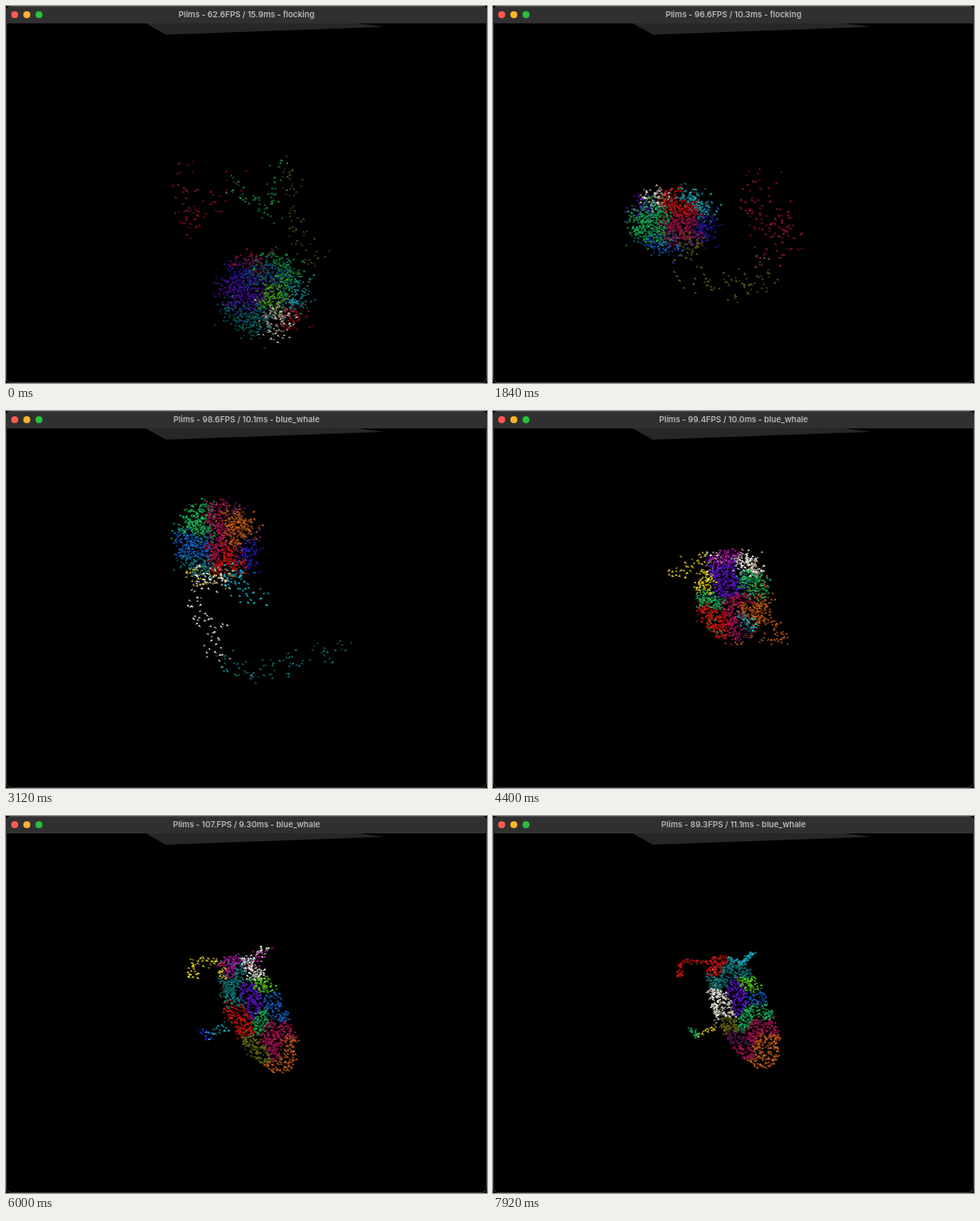
An HTML page with a canvas that plays this animation: 554x434 px, repeating every 8000 ms.

```html
<!DOCTYPE html>
<html lang="en">
<head>
<meta charset="utf-8">
<title>Flocking</title>
<style>
  html, body { margin: 0; width: 100%; height: 100%; overflow: hidden; background: #000; }
  #win { position: relative; width: 554px; height: 434px; overflow: hidden; background: #000; }
  canvas { position: absolute; left: 0; top: 0; }
  #bar { position: absolute; left: 0; top: 0; width: 554px; height: 20px; box-sizing: border-box;
    background: #303030; border-top: 1px solid #4a4a4a; border-radius: 6px 6px 0 0; }
  #bar i { position: absolute; top: 5px; width: 8px; height: 8px; border-radius: 50%; }
  #title { position: absolute; left: 0; top: 0; width: 554px; text-align: center; white-space: nowrap;
    font: 600 9.3px/20px Inter, "Liberation Sans", sans-serif; color: #b8b8b8; }
  #edge { position: absolute; inset: 0; border: 1px solid #363636; border-top: 0; border-radius: 6px; }
</style>
</head>
<body>
<div id="win">
  <canvas id="view" width="554" height="434"></canvas>
  <div id="edge"></div>
  <div id="bar">
    <i style="left:6px;background:#ff5b52"></i>
    <i style="left:20px;background:#fdb42b"></i>
    <i style="left:34px;background:#28c13c"></i>
  </div>
  <div id="title"></div>
</div>
<script>
const LOOP = 8000, STEP = 80, TRAIL = 190, BODY = 1450;
const ctx = document.getElementById('view').getContext('2d');
const title = document.getElementById('title');

const palette = {
  r: '#c81414', m: '#a41450', p: '#5616be', b: '#165cb8', g: '#1cae5a',
  l: '#54cc1c', y: '#d4c424', o: '#b8581a', w: '#e8e2d8', t: '#127678',
  c: '#16b4c4', n: '#241ca4', k: '#62641a', v: '#b414a8', d: '#4a1644'
};

// Each pose is an oval body plus a trail along a few points.
// body: x, y, rx, ry, tilt, fuzz; cells: its colours by rows; links: one colour per trail piece.
const whale = {
  body: [288, 225, 31, 72, -25, 2],
  path: [[214, 186], [217, 167], [248, 168], [285, 172], [299, 158], [285, 172], [255, 175], [257, 242], [236, 254], [227, 244]],
  spread: 3
};
const poses = [
  {
    t: 0, fps: 62.6, body: [298, 332, 46, 46, 0, 14],
    cells: 'mmgg nbbg pplc pplc ttwr ttwr', links: 'mrggkk', spread: 15,
    path: [[205, 185], [210, 255], [262, 200], [300, 245], [322, 180], [335, 250], [360, 300]]
  },
  {
    t: 1840, fps: 96.6, body: [208, 247, 46, 35, 0, 12],
    cells: 'pwrcc pgrrc ggmmn ggmmn bbbkk', links: 'kkmmm', spread: 20,
    path: [[215, 300], [290, 325], [320, 295], [345, 250], [300, 250], [310, 190]]
  },
  {
    t: 3120, fps: 98.6, body: [244, 151, 45, 47, 0, 10],
    cells: 'lgmdd ggmoo ggmoo bbmon bbmrn ttrrn ywwcc', links: 'cywwttt', spread: 15,
    path: [[292, 216], [262, 190], [215, 190], [228, 245], [250, 290], [285, 305], [335, 290], [395, 268]]
  },
  {
    t: 4400, fps: 99.4, body: [276, 212, 40, 52, 0, 6],
    cells: 'yvvww yppww yppgg yppgg ggmmo rrmoo rrmco rrmdd', links: 'ywooog', spread: 9,
    path: [[205, 188], [245, 166], [302, 170], [315, 235], [338, 264], [265, 262], [240, 215]]
  },
  {
    ...whale, t: 5360, fps: 106.99, body: [290, 228, 32, 74, -25, 5],
    cells: 'yvw ttw tpl rpb rgb kmm kmo ooo', links: 'yyvvwtrcn', spread: 10
  },
  { ...whale, t: 6720, fps: 106.9, cells: 'yyv ttw tpl kpb kgg dmm moo ooo', links: 'yyyvvwtrg' },
  { ...whale, t: 7920, fps: 89.3, cells: 'rrc ttt wpl wpb kgg dmm moo ooo', links: 'rrrcctwyg' }
];

function random(seed) {
  return () => {
    seed = (seed + 0x6D2B79F5) | 0;
    let v = Math.imul(seed ^ (seed >>> 15), seed | 1);
    v ^= v + Math.imul(v ^ (v >>> 7), v | 61);
    return ((v ^ (v >>> 14)) >>> 0) / 4294967296;
  };
}

const rnd = random(7);
const bell = () => rnd() + rnd() + rnd() - 1.5;
const bits = Array.from({ length: TRAIL + BODY }, (_, i) => {
  const a = rnd() * Math.PI * 2, r = Math.sqrt(rnd());
  return {
    along: i < TRAIL ? i / TRAIL : -1,
    u: r * Math.cos(a), v: r * Math.sin(a), jx: bell(), jy: bell(),
    light: .6 + rnd() * .6, turn: rnd() * 6.28, size: .85 + rnd() * .35
  };
});

function shade(hex, k) {
  const part = i => Math.min(255, parseInt(hex.slice(i, i + 2), 16) * k) | 0;
  return `rgb(${part(1)},${part(3)},${part(5)})`;
}

function onTrail(pose, bit) {
  const s = bit.along * pose.links.length, k = Math.floor(s), f = s - k;
  const [a, b] = pose.path.slice(k, k + 2);
  return {
    x: a[0] + (b[0] - a[0]) * f + bit.jx * pose.spread,
    y: a[1] + (b[1] - a[1]) * f + bit.jy * pose.spread,
    key: pose.links[k]
  };
}

function inBody(pose, { u, v, jx, jy }) {
  const [x, y, rx, ry, tilt, fuzz] = pose.body;
  const c = Math.cos(tilt * Math.PI / 180), s = Math.sin(tilt * Math.PI / 180);
  const pick = (list, q) => list[Math.max(0, Math.min(list.length - 1, Math.floor((q + 1) / 2 * list.length)))];
  const row = pick(pose.cells.split(' '), v + .06 * Math.sin(u * 6));
  return {
    x: x + u * rx * c - v * ry * s + jx * fuzz,
    y: y + u * rx * s + v * ry * c + jy * fuzz,
    key: pick(row, u + .08 * Math.sin(v * 7))
  };
}

for (const pose of poses) {
  const glow = Math.min(1, .75 + pose.t / 12000);
  pose.pts = bits.map(bit => {
    const p = bit.along < 0 ? inBody(pose, bit) : onTrail(pose, bit);
    return { ...p, color: shade(palette[p.key], bit.light * glow) };
  });
}

function curve(a, b, c, d, u) {
  return b + .5 * u * (c - a + u * (2 * a - 5 * b + 4 * c - d + u * (3 * (b - c) + d - a)));
}

function fill(color, ...pts) {
  ctx.fillStyle = color;
  ctx.beginPath();
  pts.forEach(([x, y]) => ctx.lineTo(x, y));
  ctx.fill();
}

function draw(time) {
  let k = 0;
  while (k < poses.length - 2 && time >= poses[k + 1].t) k++;
  const from = poses[k], to = poses[k + 1];
  const before = poses[Math.max(0, k - 1)], after = poses[Math.min(poses.length - 1, k + 2)];
  const part = (time - from.t) / (to.t - from.t);
  const bump = Math.sin(part * Math.PI);
  const drift = bump * 9 * Math.exp(-time / 2600);

  ctx.fillStyle = '#000';
  ctx.fillRect(0, 0, 554, 434);
  fill('#272727', [161, 20], [405, 20], [436, 24], [184, 33]);

  bits.forEach(({ turn, size }, i) => {
    const a = before.pts[i], b = from.pts[i], c = to.pts[i], d = after.pts[i];
    const x = curve(a.x, b.x, c.x, d.x, part) + drift * Math.cos(turn + time / 500);
    const y = curve(a.y, b.y, c.y, d.y, part) + drift * Math.sin(turn + time / 500);
    const lean = Math.sin(turn) * .8;
    fill((part < .5 ? b : c).color,
      [x - 1.7 * size, y + lean + .5], [x + 1.7 * size, y - lean + .7], [x + lean * .5, y - 1.6 * size]);
  });

  const noise = random(time)() - .5;
  const fps = from.fps + (to.fps - from.fps) * part + noise * bump * 3;
  const short = v => v.toFixed(3).slice(0, 4);
  const mode = time < 2400 ? 'flocking' : 'blue_whale';
  title.textContent = `Plims - ${short(fps)}FPS / ${short(1000 / fps)}ms - ${mode}`;
}

const start = performance.now();
let last = -1;
function tick() {
  const elapsed = Math.max(0, performance.now() - start) % LOOP;
  const time = Math.floor(elapsed / STEP) * STEP;
  if (time !== last) draw(last = time);
  requestAnimationFrame(tick);
}
tick();
</script>
</body>
</html>
```
